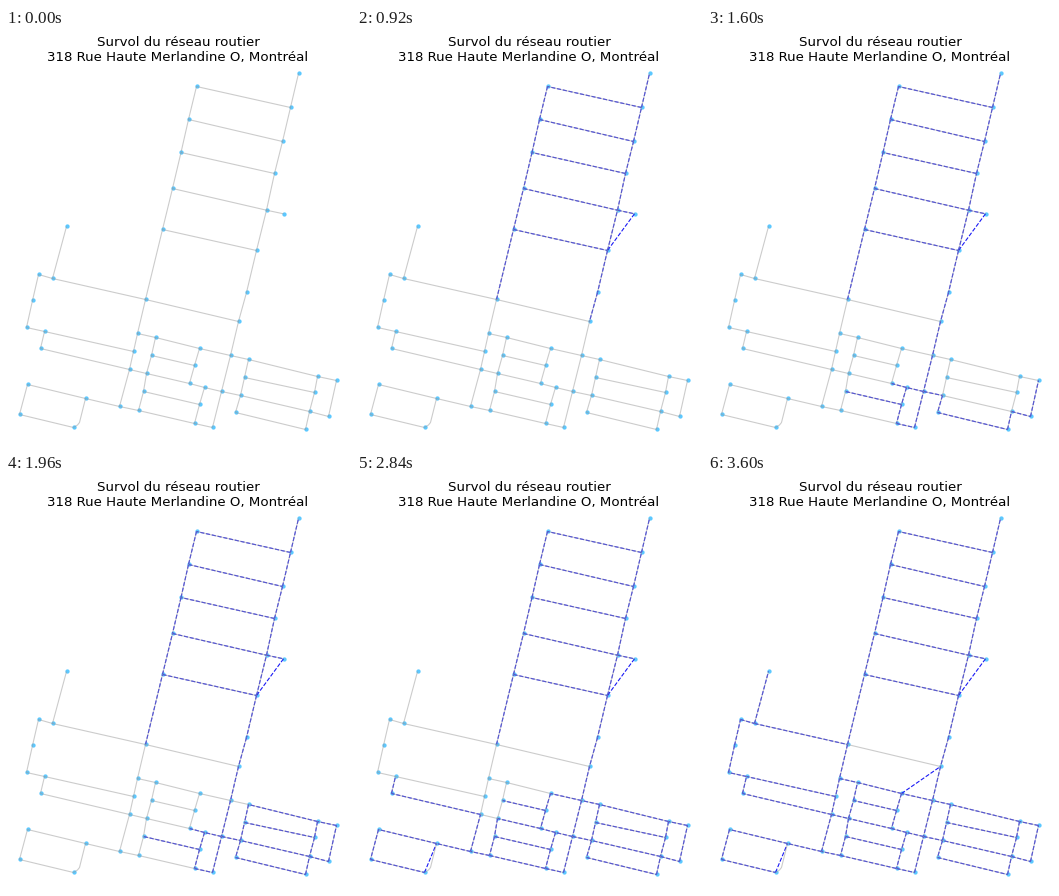
Write a matplotlib script that moves like this. It is 345x417 px and loops after 3640 ms.

```python
import matplotlib.pyplot as plt
from matplotlib.animation import FuncAnimation
from matplotlib.collections import LineCollection

W, H, DPI = 345, 417, 80
FRAMES, STEP_MS = 91, 40

# Crossings in stage pixels, counted from 1
NODES = {
    "A": (293, 46), "B": (285, 80), "C": (277, 114), "D": (269, 146),
    "E": (261, 182.7), "F": (278, 186.3), "G": (251, 223), "H": (241, 265),
    "I": (233, 294), "J": (191, 59), "K": (183, 92), "L": (175.5, 125),
    "M": (167, 161), "N": (157, 202), "O": (140, 272), "P": (61, 199),
    "Q": (47, 251), "R": (33, 247), "S": (27, 273), "T": (21, 300),
    "U": (39, 304), "V": (35, 321), "W": (128, 324), "X": (132, 306),
    "Y": (150, 310), "Z": (124, 342), "a": (141, 346), "b": (146, 328),
    "c": (194, 321), "d": (189, 338), "e": (184, 356), "f": (199, 360),
    "g": (194, 377), "h": (189, 396), "i": (207, 400), "j": (216, 364),
    "k": (225, 328), "l": (243, 332), "m": (239, 350), "n": (235, 368),
    "o": (230, 385), "p": (312, 349), "q": (331, 353), "r": (309, 365),
    "s": (304, 384), "t": (323, 389), "u": (300, 402), "v": (138, 364),
    "w": (133, 383), "x": (114, 379), "y": (80, 371), "z": (22, 357),
    "0": (14, 387), "1": (68, 400),
}
STREETS = (
    "ABCDEGHIkji EF JB KC LD ME NG JKLMNOXWZx OI OQRSTUW PQ UV VZaefjnst "
    "XYcklpq Ybavw bd cde vg fgh zyxwhi z01 lmno mr prsu qt ou"
).split()
BEND = [(68, 400), (72, 397.5), (74, 395), (80, 371)]

# Tour of the network, one crossing per frame
ROUTE = (
    "ONMEFGEDCBABJKCDLKLMNGHI"
    "kjfefgvghijnoustq"
    "prsnmrplmlkcdbdeavw"
    "hwxyz01yxZVU"
    "TSRQPQOXYXWUWZabYcI"
)


def polyline(keys):
    return [NODES[k] for k in keys]


def travelled(step):
    """Segments covered so far, each street section only once."""
    seen, segments = set(), []
    for pair in zip(ROUTE[:step], ROUTE[1:step + 1]):
        if frozenset(pair) not in seen:
            seen.add(frozenset(pair))
            segments.append(polyline(pair))
    return segments


fig = plt.figure(figsize=(W / DPI, H / DPI), dpi=DPI, facecolor="white")
ax = fig.add_axes([0, 0, 1, 1])
ax.set_xlim(0.5, W + 0.5)
ax.set_ylim(H + 0.5, 0.5)
ax.axis("off")

ax.scatter(*zip(*NODES.values()), s=15, color="#5cc8ff", linewidths=0, zorder=1)
trail = LineCollection([], colors="#1919f5", linewidths=1, linestyles="dashed",
                       zorder=2)
ax.add_collection(trail, autolim=False)
roads = [polyline(s) for s in STREETS] + [BEND]
ax.add_collection(LineCollection(roads, colors="#999999", linewidths=1,
                                 alpha=0.5, zorder=3), autolim=False)
ax.text(172.5, 33, "Survol du réseau routier\n318 Rue Haute Merlandine O, Montréal",
        ha="center", va="baseline", fontsize=12, family="DejaVu Sans",
        color="black")


def update(step):
    trail.set_segments(travelled(step))
    return (trail,)


anim = FuncAnimation(fig, update, frames=FRAMES, interval=STEP_MS,
                     init_func=lambda: update(0), repeat=True, repeat_delay=0)
plt.show()
```
